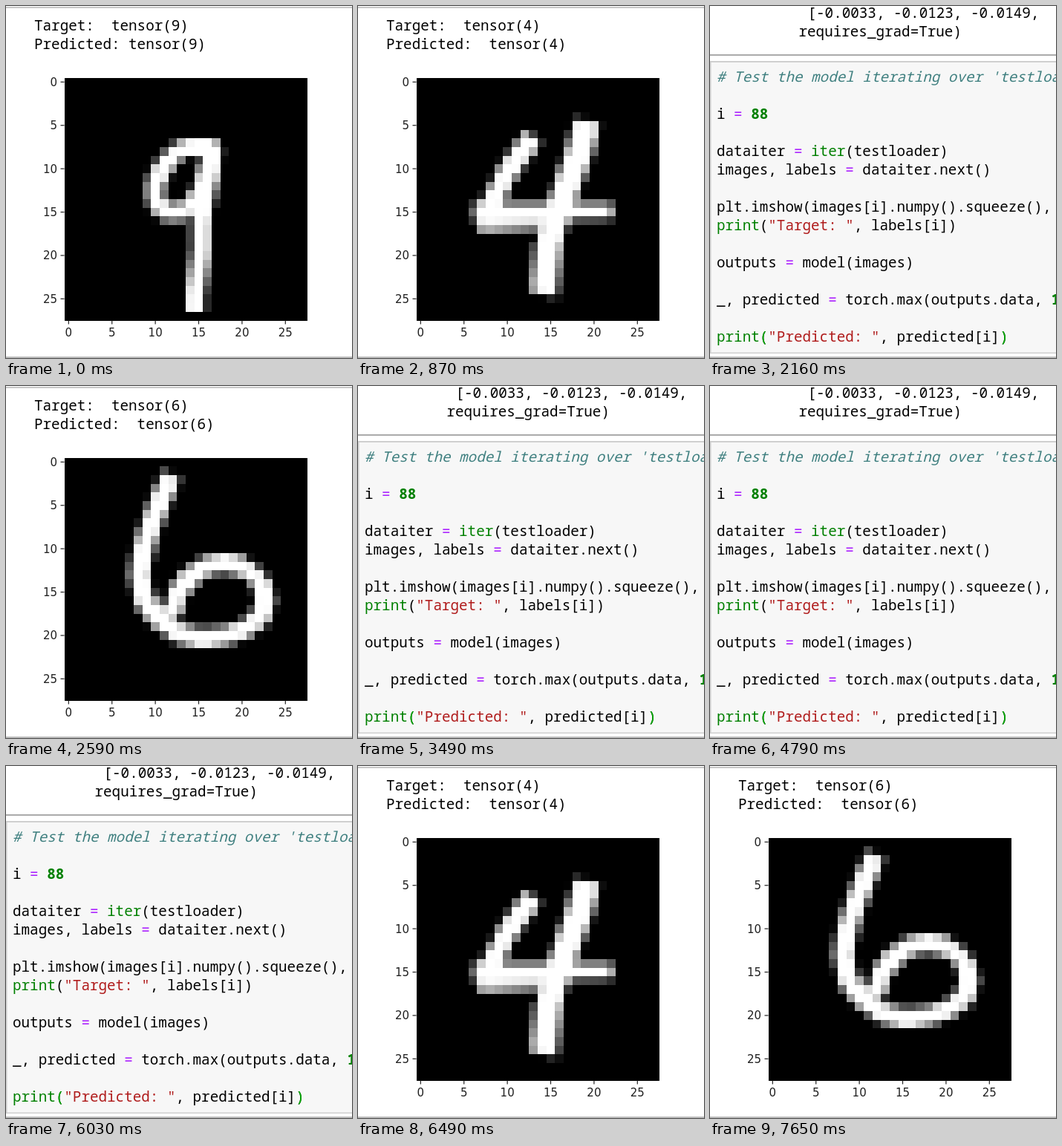
Write an HTML page with a canvas that moves like this. It is 466 px wide and 474 px high and loops after 8000 ms.

```html
<!DOCTYPE html>
<html lang="en">
<head>
<meta charset="utf-8">
<title>Digit classifier test</title>
<style>
  html, body { margin: 0; width: 100%; height: 100%; overflow: hidden; background: #fff; }
  canvas { display: block; }
</style>
</head>
<body>
<canvas id="stage" width="466" height="474"></canvas>
<script>
const W = 466, H = 474, LOOP = 8000;
const MONO = '19.25px "Noto Sans Mono", "DejaVu Sans Mono", monospace';
const SANS = '15px "DejaVu Sans", sans-serif';
const GRID = 28, PLOT = { x: 78.5, y: 96.5, size: 327 };
const LINE = 25, CODE_X = 9, CODE_Y = 102;

// Pen strokes on the 28 x 28 grid: [line width, path]
const PEN = {
  4: [
    [2.4, 'M13.5 6.7 Q10 10.7 8 16'],
    [1.9, 'M6.6 15.5 L22.7 15.4 M7.1 16.8 L17 16.2'],
    [3, 'M19.7 5 C18.8 11 15.3 16 15.2 20 L14.7 25']
  ],
  6: [
    [2.3, 'M12.4 2 C9.8 7.5 8.8 10 8.7 13.5 S12 20.9 16 20.8 S23.2 19 23.2 16.4 S20.5 12.2 18.2 12.2 S12.3 14.8 12.4 18.2']
  ],
  9: [
    [2, 'M17.7 8 H14.5 C13 8 10.3 11 10.4 13 C10.4 15.5 12 15.7 14 15.2 C15.5 14.5 17 11 17 8'],
    [2.12, 'M17.1 8 C17 12 15.8 14 15.8 17 V20 L15.1 25 V27']
  ]
};

// Moments when the code appears, the result shows through, the result stands alone
const CUTS = [
  [0, 0, 0], [530, 760, 870], [2160, 2370, 2590], [3490, 3690, 3910],
  [4790, 5040, 5240], [6030, 6390, 6490], [7300, 7530, 7650]
];
const DIGITS = [9, 4, 6, 4];

const CODE = `# Test the model iterating over 'testloader'

i = 88

dataiter = iter(testloader)
images, labels = dataiter.next()

plt.imshow(images[i].numpy().squeeze(),
print("Target: ", labels[i])

outputs = model(images)

_, predicted = torch.max(outputs.data, 1)

print("Predicted: ", predicted[i])`.split('\n');

const TOKEN = /(?<comment>^#.*)|(?<string>".*?")|(?<builtin>\b(?:iter|print)\b)|(?<number>\b\d+\b)|(?<operator>=)|\w+|[^\w"=]+/g;
const STYLES = {
  comment: ['#408080', 'italic '],
  string: ['#b01c1c', ''],
  builtin: ['#008000', ''],
  number: ['#008000', 'bold '],
  operator: ['#aa22ff', '']
};

function scene(draw, w = W, h = H) {
  const canvas = document.createElement('canvas');
  canvas.width = w;
  canvas.height = h;
  draw(canvas.getContext('2d'));
  return canvas;
}

function rect(c, color, x, y, w, h) {
  c.fillStyle = color;
  c.fillRect(x, y, w, h);
}

function text(c, str, x, y, color = '#000', font = MONO) {
  c.font = font;
  c.fillStyle = color;
  c.fillText(str, x, y);
}

function drawPage(c) {
  rect(c, '#fff', 0, 0, W, H);
  rect(c, '#bdbdbd', 0, 472, W, 2);
}

function drawCode(c) {
  drawPage(c);
  text(c, '[-0.0033, -0.0123, -0.0149,', 131.5, 16);
  text(c, 'requires_grad=True)', 119.5, 41);
  rect(c, '#ababab', 0, 65, W, 2);
  rect(c, '#cfcfcf', 0, 74, W, 394);
  rect(c, '#f7f7f7', 1.5, 76, W, 390.5);

  c.font = MONO;
  const advance = c.measureText('0').width;
  const put = (str, col, row, color, style = '') =>
    text(c, str, CODE_X + col * advance, CODE_Y + row * LINE, color, style + MONO);

  CODE.forEach((line, row) => {
    for (const m of line.matchAll(TOKEN)) {
      const kind = Object.keys(STYLES).find(k => m.groups[k]);
      put(m[0], m.index, row, ...(STYLES[kind] ?? []));
    }
  });

  // Matched brackets of the last call
  const row = CODE.length - 1, line = CODE[row];
  for (const col of [line.indexOf('('), line.lastIndexOf(')')])
    put(line[col], col, row, '#00b000');
}

function drawDigit(c, digit) {
  rect(c, '#000', 0, 0, GRID, GRID);
  c.strokeStyle = '#fff';
  c.lineJoin = 'round';
  for (const [width, path] of PEN[digit]) {
    c.lineWidth = width;
    c.stroke(new Path2D(path));
  }
}

function drawResult(c, digit, gap) {
  drawPage(c);
  rect(c, '#c8c8c8', 0, 1, W, 2);
  text(c, `Target:  tensor(${digit})`, 38, 33);
  text(c, `Predicted:${gap}tensor(${digit})`, 38, 58);

  const { x, y, size } = PLOT;
  c.imageSmoothingEnabled = false;
  c.drawImage(scene(d => drawDigit(d, digit), GRID, GRID), x, y, size, size);

  for (let k = 0; k < GRID; k += 5) {
    const at = (k + .5) * size / GRID;
    rect(c, '#222', x - 5, y + at - .6, 5, 1.2);
    rect(c, '#222', x + at - .6, y + size, 1.2, 5);
    c.textAlign = 'right';
    text(c, k, 69, y + at + 5.5, '#222', SANS);
    c.textAlign = 'center';
    text(c, k, x + at, 445, '#222', SANS);
  }
}

const codeScene = scene(drawCode);
const results = CUTS.map((_, i) =>
  scene(c => drawResult(c, DIGITS[i % DIGITS.length], i ? '  ' : ' ')));

const stage = document.getElementById('stage').getContext('2d');
const start = performance.now();

function frame() {
  const t = (performance.now() - start) % LOOP;
  const i = CUTS.findLastIndex(([code]) => t >= code);
  const [, mix, out] = CUTS[i];
  stage.globalAlpha = 1;
  stage.drawImage(codeScene, 0, 0);
  stage.globalAlpha = t >= out ? 1 : t >= mix ? .6 : 0;
  stage.drawImage(results[i], 0, 0);
  requestAnimationFrame(frame);
}
frame();
</script>
</body>
</html>
```
